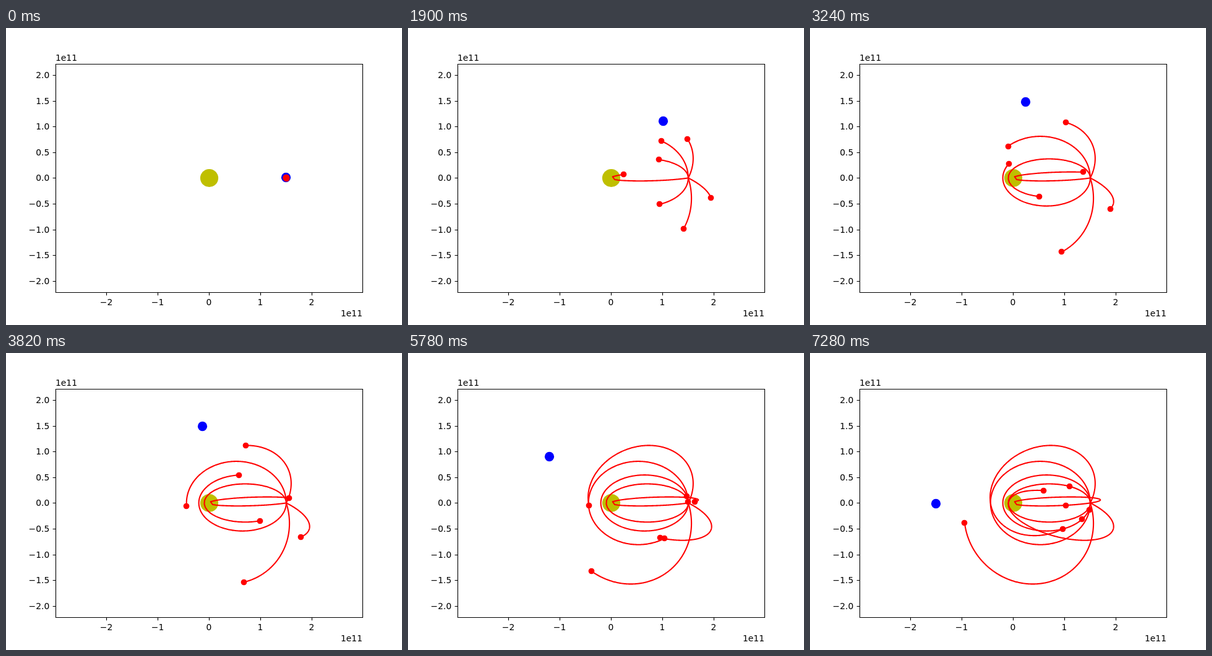
An HTML page for the animation above (7.3 s loop, 640x480 px).

```html
<!DOCTYPE html>
<html lang="en">
<head>
<meta charset="utf-8">
<title>Probes launched around a star</title>
<style>
  html, body { margin: 0; width: 100%; height: 100%; overflow: hidden; background: #fff; }
  svg { display: block; width: 640px; height: 480px; }
  text { font: 13.89px "DejaVu Sans", sans-serif; fill: #000; }
  .axes { fill: none; stroke: #000; stroke-width: 1.11; }
  .trail { fill: none; stroke: #f00; stroke-width: 2.08; stroke-linejoin: round; }
</style>
</head>
<body>
<svg id="stage" viewBox="0 0 640 480"></svg>
<script>
const STEP = 20, FRAMES = 365;
const CX = 328, CY = 242.4, UNIT = 83.12;
const MU = 143;            // star's pull, in px^3 / frame^2
const LAUNCH = 124.9;      // launch distance from the star, px
const PLANET = { radius: 124.5, rate: 0.4945 * Math.PI / 180, lead: 0.6 };

// Launch velocities in px per frame (y up), with an optional delay in frames
const PROBES = [
  { vx: 0, vy: 0.718 },
  { vx: 0.368, vy: 0.718 },
  { vx: 0, vy: 0.363 },
  { vx: -0.515, vy: -0.078, delay: 1.7 },
  { vx: 0, vy: -0.5156 },
  { vx: 0.3, vy: -0.934 },
  { vx: 0.7245, vy: -0.36 }
];

const stage = document.getElementById("stage");

function add(tag, attrs, text) {
  const node = document.createElementNS("http://www.w3.org/2000/svg", tag);
  for (const key in attrs) node.setAttribute(key, attrs[key]);
  if (text !== undefined) node.textContent = text;
  return stage.appendChild(node);
}

const label = (x, y, anchor, text) => add("text", { x, y, "text-anchor": anchor }, text);
const signed = (value, digits) => value.toFixed(digits).replace("-", "\u2212");
const disc = (r, fill) => add("circle", { r, fill });

// Markers sit on whole pixels
function place(node, [x, y]) {
  node.setAttribute("cx", Math.floor(x) + 0.5);
  node.setAttribute("cy", Math.floor(y) + 0.5);
}

// Kepler motion from the launch state, using Lagrange's f and g functions
function orbit({ vx, vy, delay = 0 }) {
  const a = 1 / (2 / LAUNCH - (vx * vx + vy * vy) / MU);
  const pace = Math.sqrt(a ** 3 / MU);
  const c = 1 - LAUNCH / a;
  const s = LAUNCH * vx / Math.sqrt(MU * a);
  return frame => {
    const t = Math.max(0, frame + 1 - delay);
    const mean = t / pace;
    let low = mean - 3, high = mean + 3;
    for (let i = 0; i < 45; i++) {
      const mid = (low + high) / 2;
      if (mid - c * Math.sin(mid) + s * (1 - Math.cos(mid)) < mean) low = mid;
      else high = mid;
    }
    const f = 1 - a / LAUNCH * (1 - Math.cos(low));
    const g = t - pace * (low - Math.sin(low));
    return [CX + f * LAUNCH + g * vx, CY - g * vy];
  };
}

function drawAxes() {
  let d = "M80.5 58.5H576.5V427.5H80.5Z";
  for (let i = -2; i <= 2; i++) {
    const x = Math.round(CX + i * UNIT);
    d += `M${x + 0.5} 427.5v4.86`;
    label(x, 448, "middle", signed(i, 0));
  }
  for (let i = -4; i <= 4; i++) {
    const y = Math.round(CY - i / 2 * UNIT);
    d += `M80.5 ${y + 0.5}h-4.86`;
    label(70.3, y + 5, "end", signed(i / 2, 1));
  }
  label(80, 53, "start", "1e11");
  label(576, 466, "end", "1e11");
  return d;
}

const axes = drawAxes();
place(disc(14.6, "#bfbf00"), [CX, CY]);
const planet = disc(7.64, "#00f");

const probes = PROBES.map(launch => {
  const at = orbit(launch);
  return {
    points: Array.from({ length: FRAMES }, (_, frame) => at(frame)),
    trail: add("polyline", { class: "trail" })
  };
});
for (const probe of probes) probe.dot = disc(4.86, "#f00");
add("path", { class: "axes", d: axes });

function draw(frame) {
  const angle = PLANET.rate * (frame + PLANET.lead);
  place(planet, [CX + PLANET.radius * Math.cos(angle), CY - PLANET.radius * Math.sin(angle)]);
  for (const { points, trail, dot } of probes) {
    const path = [[CX + LAUNCH, CY], ...points.slice(0, frame + 1)];
    trail.setAttribute("points", path.map(p => p[0].toFixed(2) + "," + p[1].toFixed(2)).join(" "));
    place(dot, points[frame]);
  }
}

const start = performance.now();
function tick() {
  draw(Math.floor((performance.now() - start) / STEP) % FRAMES);
  requestAnimationFrame(tick);
}
tick();
</script>
</body>
</html>
```
